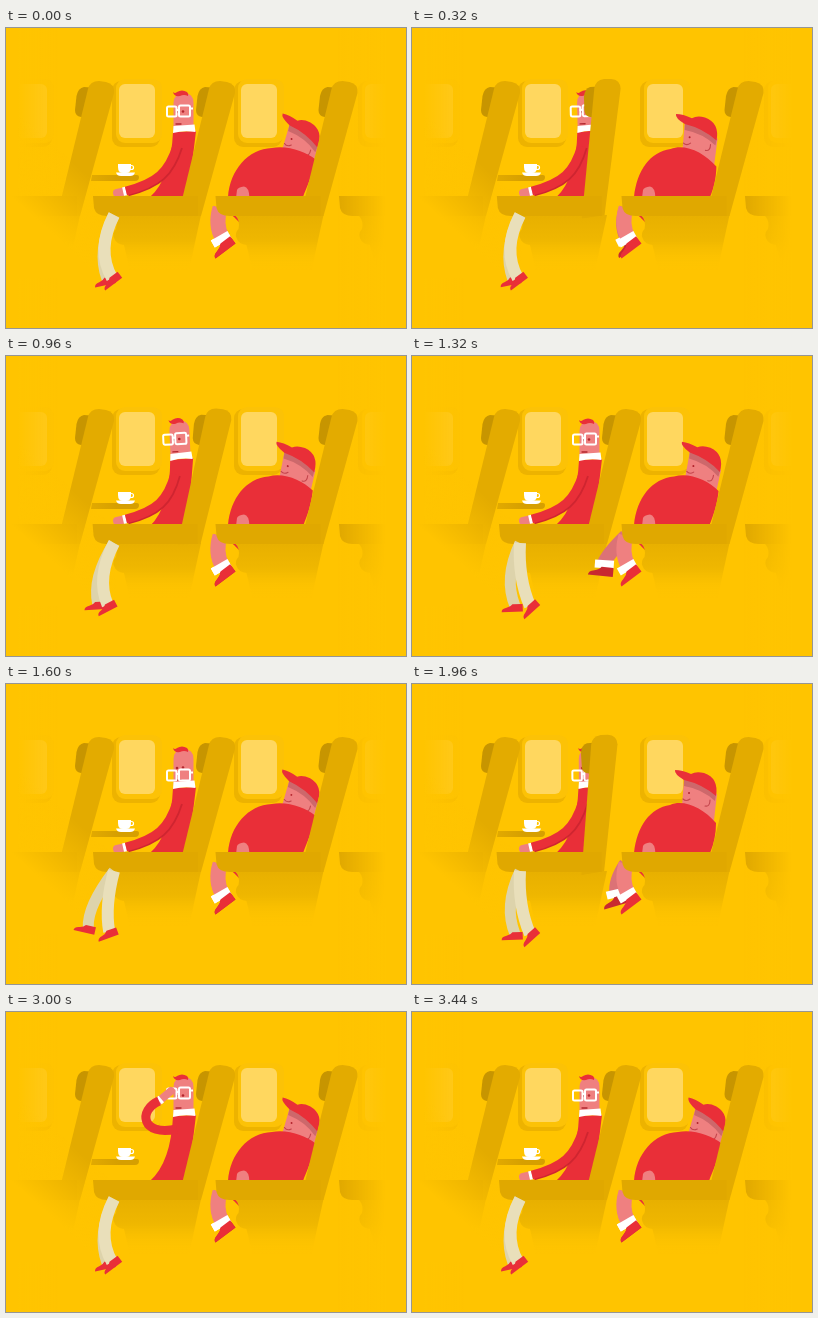
Recreate the animation shown at these times as an HTML page. Size 400 by 300 pixels, loop 3480 ms.

```html
<!DOCTYPE html>
<html lang="en">
<head>
<meta charset="utf-8">
<title>Seat kicker</title>
<style>
html, body { margin: 0; width: 100%; height: 100%; overflow: hidden; background: #ffc400; }
svg { display: block; width: 100vw; height: 100vh; }
.line { fill: none; stroke-linecap: round; stroke-linejoin: round; }
.flat { fill: none; stroke-linecap: butt; }
.red { fill: #e92f38; }
.skin { fill: #ef8080; }
.white { fill: #fff; }
</style>
</head>
<body>
<svg viewBox="0 0 400 300">
  <defs>
    <linearGradient id="down" gradientUnits="userSpaceOnUse" x1="0" y1="188" x2="0" y2="242">
      <stop offset="0" stop-color="#e8b000"/>
      <stop offset=".45" stop-color="#efb700"/>
      <stop offset="1" stop-color="#ffc400" stop-opacity="0"/>
    </linearGradient>
    <linearGradient id="corner" gradientUnits="userSpaceOnUse" x1="40" y1="200" x2="85" y2="150">
      <stop offset="0" stop-color="#ffc400"/>
      <stop offset="1" stop-color="#ffc400" stop-opacity="0"/>
    </linearGradient>
    <linearGradient id="edge" gradientUnits="userSpaceOnUse" x1="0" y1="0" x2="400" y2="0">
      <stop offset=".03" stop-color="#ffc400"/>
      <stop offset=".13" stop-color="#ffc400" stop-opacity="0"/>
      <stop offset=".83" stop-color="#ffc400" stop-opacity="0"/>
      <stop offset=".95" stop-color="#ffc400"/>
    </linearGradient>
    <linearGradient id="tray" gradientUnits="userSpaceOnUse" x1="82" y1="0" x2="112" y2="0">
      <stop offset="0" stop-color="#e3ab00"/>
      <stop offset="1" stop-color="#d69f00"/>
    </linearGradient>

    <g id="window">
      <rect x="106" y="53" width="48" height="66" rx="9" fill="#edb300"/>
      <rect x="110" y="51" width="46" height="64" rx="9" fill="#fcc206"/>
      <rect x="113" y="56" width="36" height="54" rx="6" fill="#ffd75f"/>
    </g>
    <path id="base" fill="url(#down)" d="M106 187Q112 192 110 201Q106 205 108 210Q110 216 118 217L124 242H183L195 187Z"/>
    <g id="back">
      <path fill="#c79500" d="M199 59Q193 60 191.500 68L190 82Q190 88 196 89L206 90L212 60Z"/>
      <path fill="#e3ab00" d="M203 61Q205 53 214 53L221 54Q230 56 229 65L195 188H172Z"/>
    </g>
    <path id="cushion" fill="#e0a800" d="M87 168H192V188H101Q90 188 88 180Z"/>
    <path id="shoe" class="red" d="M9 -1L-3 -1Q-5 2 -10 3Q-16 4 -16 8H9Z"/>
  </defs>

  <rect width="400" height="300" fill="#ffc400"/>
  <use href="#window"/>
  <use href="#window" x="122"/>
  <g opacity=".35"><use href="#window" x="-108"/><use href="#window" x="246"/></g>
  <use href="#base" x="246"/><use href="#cushion" x="246"/>
  <rect width="400" height="300" fill="url(#edge)"/>

  <g transform="translate(-121)">
    <use href="#base"/><use href="#back"/><use href="#cushion"/>
  </g>
  <rect width="110" height="250" fill="url(#corner)"/>
  <path fill="url(#tray)" d="M86 147H131Q133 147 133 149Q133 153 129 153H85Z"/>
  <g class="white">
    <path d="M112 136H125V139Q125 145 120 145H117Q112 145 112 139Z"/>
    <path d="M110 144.500H129Q128 148 124 148H115Q111 148 110 144.500Z"/>
    <circle cx="125.500" cy="139.500" r="2" fill="none" stroke="#fff" stroke-width="1.200"/>
  </g>

  <g id="man">
    <path class="skin" d="M167.500 102V75Q168 65 177.500 65Q187.500 65 187.500 75V102Z"/>
    <path class="red" d="M167 64Q169 66 171 64Q176 61 181 64Q183 66 182 68Q178 66 174 68Q168 69 167 64Z"/>
    <circle cx="171" cy="84" r="1.300" fill="#b3262e"/>
    <circle cx="177" cy="83.500" r="1.300" fill="#b3262e"/>
    <path class="line" d="M170 96H175" stroke="#b3262e" stroke-width="1.300"/>
    <g id="glasses" fill="none" stroke="#fff" stroke-width="2">
      <rect x="161" y="78.500" width="9.500" height="10" rx="1.500"/>
      <rect x="173" y="77.500" width="11" height="11" rx="1.500"/>
      <path d="M170 82H173M184 80.500H187"/>
    </g>
    <path class="red" d="M167 104L190 103L182 169H144Q165 150 167 104Z"/>
    <path class="white" d="M167.500 98L188.500 96.500L189.500 104Q178 102 167 105Z"/>
  </g>
  <path id="armShade" class="flat" stroke="#cf2530" stroke-width="9"/>
  <path id="hand" class="line" stroke="#ef8080" stroke-width="8"/>
  <path id="cuff" class="flat" stroke="#fff" stroke-width="8.500" stroke-dasharray="3 99"/>
  <path id="arm" class="flat" stroke="#e92f38" stroke-width="9"/>

  <use href="#base"/>
  <g id="seat">
    <use href="#back" id="tilt"/><use href="#cushion"/>
  </g>
  <g id="manLegs">
    <path class="flat" stroke="#ddd3ab" stroke-width="11"/><use href="#shoe"/>
    <path class="flat" stroke="#e9dfba" stroke-width="12"/><use href="#shoe"/>
  </g>

  <path class="red" d="M222 184H238L235 196L228 189Z"/>
  <g id="bigLegs">
    <path class="flat" stroke="#dc7276" stroke-width="14"/><path class="white"/><use href="#shoe" style="filter:brightness(.86)"/>
    <path class="flat" stroke="#ef8080" stroke-width="15"/><path class="white"/><use href="#shoe"/>
  </g>
  <g id="bigHead">
    <path class="skin" d="M272 95L270 122L301 145L305 110Z"/>
    <path fill="#cd686b" d="M272 95Q290 99 304 111L303 117Q290 105 272 102Z"/>
    <path class="red" d="M263 86Q262 90 272 96Q290 100 304 112Q307 94 292 89Q284 87 279 90Q270 86 263 86Z"/>
    <circle cx="277" cy="109" r="1" fill="#b3262e"/>
    <path class="line" d="M271 115Q274 118 278 115M293 122Q298 123 298 116" stroke="#c4454c" stroke-width="1.100"/>
  </g>
  <path id="belly" class="red"/>
  <path class="skin" d="M230 170L231 162Q232 159 238 158.500Q243 159 243.500 170Z"/>
  <g transform="translate(122.500)">
    <use href="#base"/><use href="#back"/><use href="#cushion"/>
  </g>
</svg>
<script>
const LOOP = 3480, KICK = 560, KICKS = 4, IMPACT = 280;
const $ = id => document.getElementById(id);
const set = (el, name, value) => el.setAttribute(name, value);
const mix = (a, b, k) => a.map((v, i) => v + (b[i] - v) * k);

// Eased 0 to 1 between two times, and a rise and fall around a peak.
function ramp(t, from, to) {
  const k = Math.min(1, Math.max(0, (t - from) / (to - from)));
  return k * k * (3 - 2 * k);
}
const bump = (t, from, peak, to) => ramp(t, from, peak) - ramp(t, peak, to);

// Shoulder, two control points, wrist, fingertips.
const armDown = [171, 118, 163, 144, 151, 155, 120, 163, 111, 165];
const armUp = [171, 117, 135, 125, 132, 98, 153, 89, 165, 79];
const bellyBack = [222, 169, 224, 142, 242, 121, 266, 120, 282, 117, 300, 124, 309, 131, 306, 150, 300, 160, 297, 169];
const bellyFront = [222, 169, 225, 142, 238, 124, 258, 121, 272, 115, 291, 124, 304, 139, 304, 150, 302, 160, 298, 169];

function placeShoe(el, [x, y, angle], size = 1) {
  set(el, 'transform', `translate(${x} ${y}) rotate(${angle}) scale(${size})`);
}

function trouserLeg([leg, shoe], foot, bow) {
  const [x, y] = foot;
  set(leg, 'd', `M108 187Q${(108 + x) / 2 - bow} 222 ${x} ${y + 1}`);
  placeShoe(shoe, foot, .85);
}

function bareLeg([leg, sock, shoe], foot) {
  const [x, y, angle] = foot;
  set(leg, 'd', `M214 180Q${(x + 214) / 2 - 7} 197 ${x - 1} ${y - 4}`);
  set(sock, 'd', 'M-10 -8H9V0H-10Z');
  set(sock, 'transform', `translate(${x} ${y}) rotate(${angle * .8})`);
  placeShoe(shoe, foot);
}

const trousers = [...$('manLegs').children], bare = [...$('bigLegs').children];

function moveBigMan(phase) {
  const rest = [217.5, 214.5, -37], out = [191, 212, 8];
  bareLeg(bare.slice(0, 3), mix(rest, out, bump(phase, 120, 215, 340)));
  bareLeg(bare.slice(3), rest);

  const lean = bump(phase, 120, 285, 500), back = 1 - lean;
  set($('bigHead'), 'transform', `translate(${10.5 * back} ${3.5 * back}) rotate(${12 * back} 283.5 99)`);
  const b = mix(bellyBack, bellyFront, lean);
  set($('belly'), 'd', `M${b[0]} ${b[1]}C${b.slice(2).join(' ')}Z`);
}

function moveSeat(phase) {
  const push = bump(phase, 205, 285, 440);
  set($('seat'), 'transform', `translate(${-2.5 * push})`);
  set($('tilt'), 'transform', `rotate(${-9.5 * push} 190 190)`);
}

function moveMan(t, phase, bend) {
  set($('man'), 'transform', `rotate(${-bend} 165 168)`);
  const slip = 8 * (ramp(t, 1440, 1560) - ramp(t, 2900, 2990)) - 2 * bump(t, 2900, 2990, 3160);
  set($('glasses'), 'transform', `translate(0 ${slip})`);

  const reach = ramp(t, 2680, 2900) - ramp(t, 3080, 3320);
  const a = mix(armDown, armUp, reach);
  a[0] -= bend * .85;
  a[2] -= bend * .4;
  const curve = `M${a[0]} ${a[1]}C${a.slice(2, 8).join(' ')}`;
  const fingers = `M${a[6]} ${a[7]}L${a[8]} ${a[9]}`;
  set($('arm'), 'd', curve);
  set($('armShade'), 'd', curve);
  set($('armShade'), 'transform', 'translate(1.500 1)');
  set($('armShade'), 'opacity', 1 - reach);
  set($('hand'), 'd', fingers);
  set($('cuff'), 'd', fingers);
}

function moveManLegs(t) {
  const since = t - IMPACT, n = Math.floor(since / KICK);
  const hit = n >= 0 && n < KICKS;
  const swing = hit ? bump(since % KICK, 20, 180, 480) * (n + 1) / KICKS : 0;
  const spread = ramp(t, 860, 1200) - ramp(t, 2200, 2480);
  const calm = ramp(t, 2200, 2480) - ramp(t, 2580, 2780);
  trouserLeg(trousers.slice(0, 2),
    [101 + 2 * spread - 28 * swing, 250 - spread - 9 * swing, -12 + 10 * spread + 8 * calm + 20 * swing], 14);
  trouserLeg(trousers.slice(2),
    [106 + 12 * spread - 20 * swing, 249 - 3 * swing, -37 - 5 * spread + 27 * calm + 30 * swing], 17 - 10 * spread);
}

function render(t) {
  const n = Math.floor(t / KICK), phase = n < KICKS ? t % KICK : 0;
  moveBigMan(phase);
  moveSeat(phase);
  moveMan(t, phase, 2 * (n + 1) * bump(phase, 270, 345, 480));
  moveManLegs(t);
}

const start = performance.now();
function tick() {
  render((performance.now() - start) % LOOP);
  requestAnimationFrame(tick);
}
tick();
</script>
</body>
</html>
```
